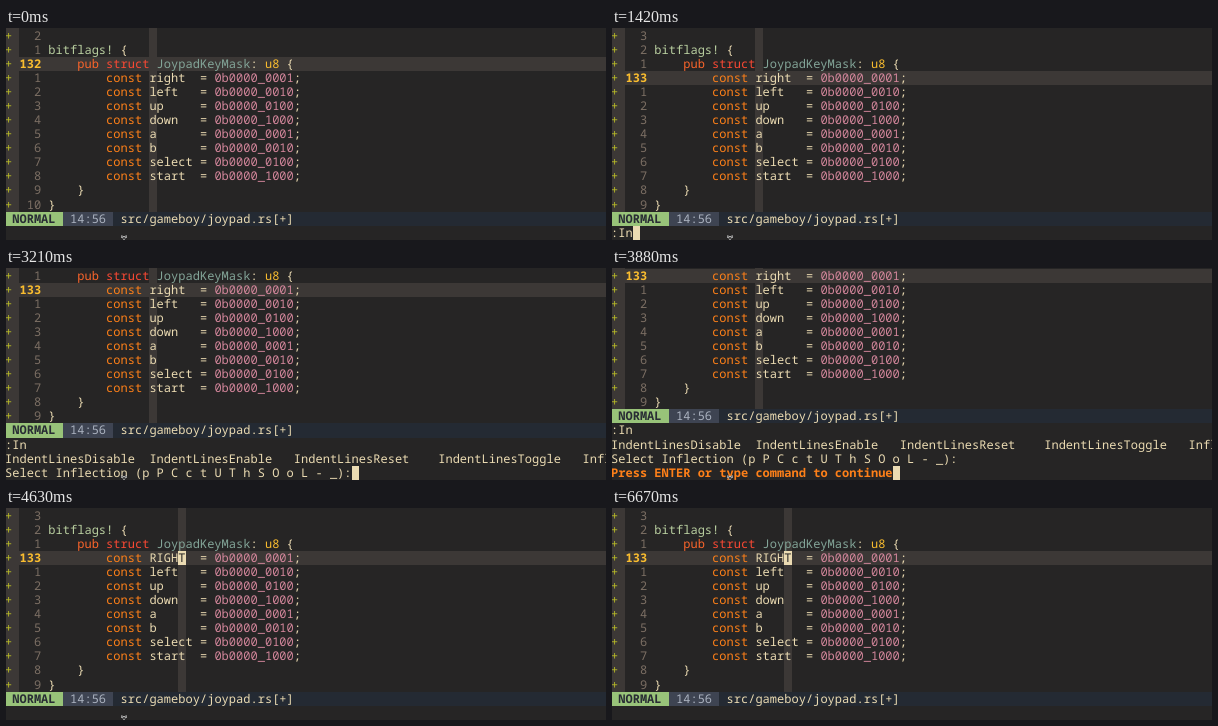
These frames come from a looping animation (600x212 px, 6.71 s). An HTML page:

```html
<!DOCTYPE html>
<html lang="en">
<head>
<meta charset="utf-8">
<title>Changing case in an editor</title>
<style>
  html, body { margin: 0; width: 100%; height: 100%; overflow: hidden; background: #262525; }
  #stage { position: relative; width: 600px; height: 212px; overflow: hidden; background: #262525; }
  #screen div { position: absolute; }
  .t {
    font: 500 12px/14px "Noto Sans Mono", "DejaVu Sans Mono", monospace;
    white-space: pre; letter-spacing: .02px; text-rendering: geometricPrecision;
  }
  .bold { font-weight: 700; }
  #mouse { position: absolute; left: 0; top: 0; }
</style>
</head>
<body>
<div id="stage">
  <div id="screen"></div>
  <svg id="mouse" width="600" height="212" fill="none">
    <path d="M115 208.5Q118 208.5 118 211Q118 208.5 121 208.5M118 210V213" stroke="#d8d8d8" stroke-width="2"/>
    <path d="M115.5 208.5Q118 208.5 118 211Q118 208.5 120.5 208.5M118 210V213" stroke="#222" stroke-width=".8"/>
  </svg>
</div>
<script>
const LOOP = 6710, MOUSE_GONE = 5330;
const CELL = 7.22, ROW = 14.05, GUTTER = 6, LAST_ROW = 14, FIRST_LINE = 130;
const C = {
  bg: "#262525", band: "#3c3836", text: "#ebdbb2", dim: "#7c6f64", yellow: "#fabd2f",
  red: "#fb4934", pub: "#fb652b", orange: "#fe8019", blue: "#83a598", purple: "#d3869b",
  macro: "#b9cfa0", sign: "#b8bb26", green: "#98c379", slate: "#3e4452", bar: "#242a33"
};

const fields = ["right", "left", "up", "down", "a", "b", "select", "start"];
const bits = ["0001", "0010", "0100", "1000"];
const code = [
  "", "bitflags! {", "    pub struct JoypadKeyMask: u8 {",
  ...fields.map((name, i) => `        const ${name.padEnd(6)} = 0b0000_${bits[i % 4]};`),
  "    }", "}"
];
const syntax = [
  [/^bitflags!/, C.macro], [/^pub$/, C.pub], [/^struct$/, C.red], [/^const$/, C.orange],
  [/^Joypad/, C.blue], [/^u8$/, C.yellow], [/^0b/, C.purple]
];

const list = ["IndentLinesDisable", "IndentLinesEnable", "IndentLinesReset", "IndentLinesToggle", "Inflect"]
  .map(s => s.padEnd(20)).join("");
const menu = [":In", list];
const prompt = "Select Inflection (p P C c t U T h S O o L - _):";
const more = "Press ENTER or type command to continue";

// time, cursor line, cursor column, command lines, extra flags
const steps = [
  [0, 2, 14, [], { hideCursor: true }],
  [40, 2, 14, []],
  [290, 3, 14, []],
  [960, 3, 14, [":"]],
  [1170, 3, 14, [":I"]],
  [1300, 3, 14, [":In"]],
  [1500, 3, 14, [...menu, ":In"]],
  [1750, 3, 14, [...menu, ":Inf"]],
  [2260, 3, 14, [...menu, ":Inflect"]],
  [2960, 3, 14, [...menu, prompt]],
  [3840, 3, 14, [...menu, prompt, more]],
  [4210, 3, 18, [], { upper: true }]
];

const screen = document.getElementById("screen");
const mouse = document.getElementById("mouse");
const xOf = col => col * CELL - 1;
const yOf = row => Math.round(0.9 + row * ROW);

function add(css, text = "", cls = "") {
  const el = document.createElement("div");
  el.className = cls;
  el.style.cssText = css;
  el.textContent = text;
  screen.append(el);
}

// Fills whole cells, with edges on whole pixels.
function fill(col, row, cols, rows, color) {
  const x = Math.round(xOf(col)), y = yOf(row);
  const w = Math.round(xOf(col + cols)) - x, h = yOf(row + rows) - y;
  add(`left:${x}px;top:${y}px;width:${w}px;height:${h}px;background:${color}`);
}

function put(col, row, text, color, bold) {
  add(`left:${xOf(col)}px;top:${yOf(row)}px;color:${color}`, text, bold ? "t bold" : "t");
}

function drawCursor(col, row, char = "") {
  fill(col, row, 1, 1, C.text);
  put(col, row, char, C.bg);
}

function drawStatus(row) {
  fill(0, row, 84, 1, C.bar);
  fill(0, row, 8, 1, C.green);
  fill(8, row, 7, 1, C.slate);
  put(1, row, "NORMAL", "#282c34", true);
  put(9, row, "14:56", "#abb2bf");
  put(16, row, "src/gameboy/joypad.rs[+]", C.text);
}

function drawCode(text, row) {
  for (const m of text.matchAll(/bitflags!|\w+|[^\w\s]+/g)) {
    const rule = syntax.find(([re]) => re.test(m[0]));
    put(GUTTER + m.index, row, m[0], rule ? rule[1] : C.text);
  }
}

function render([, line, col, cmd, flags = {}]) {
  screen.replaceChildren();
  const shift = Math.max(0, cmd.length - 1);
  const statusRow = code.length - shift;
  fill(0, -1, 2, statusRow + 1, C.band);
  fill(GUTTER + col, -1, 1, statusRow + 1, C.band);
  fill(2, line - shift, 82, 1, C.band);

  code.forEach((source, i) => {
    const row = i - shift;
    if (row < 0) return;
    const text = flags.upper && i === line ? source.replace("right", "RIGHT") : source;
    const here = i === line;
    const number = here ? FIRST_LINE + i : Math.abs(i - line);
    put(0, row, "+", C.sign);
    put(2, row, String(number).padStart(3), here ? C.yellow : C.dim, here);
    drawCode(text, row);
    if (here && !cmd.length && !flags.hideCursor) drawCursor(GUTTER + col, row, text[col]);
  });

  drawStatus(statusRow);
  cmd.forEach((text, i) => {
    const isMore = text === more;
    put(0, LAST_ROW - shift + i, text, isMore ? C.orange : C.text, isMore);
  });
  if (cmd.length) drawCursor(cmd[shift].length, LAST_ROW);
}

let shown;
function tick() {
  const t = performance.now() % LOOP;
  const step = steps.findLast(s => s[0] <= t);
  if (step !== shown) render(shown = step);
  mouse.style.display = t < MOUSE_GONE ? "" : "none";
  requestAnimationFrame(tick);
}
tick();
</script>
</body>
</html>
```
